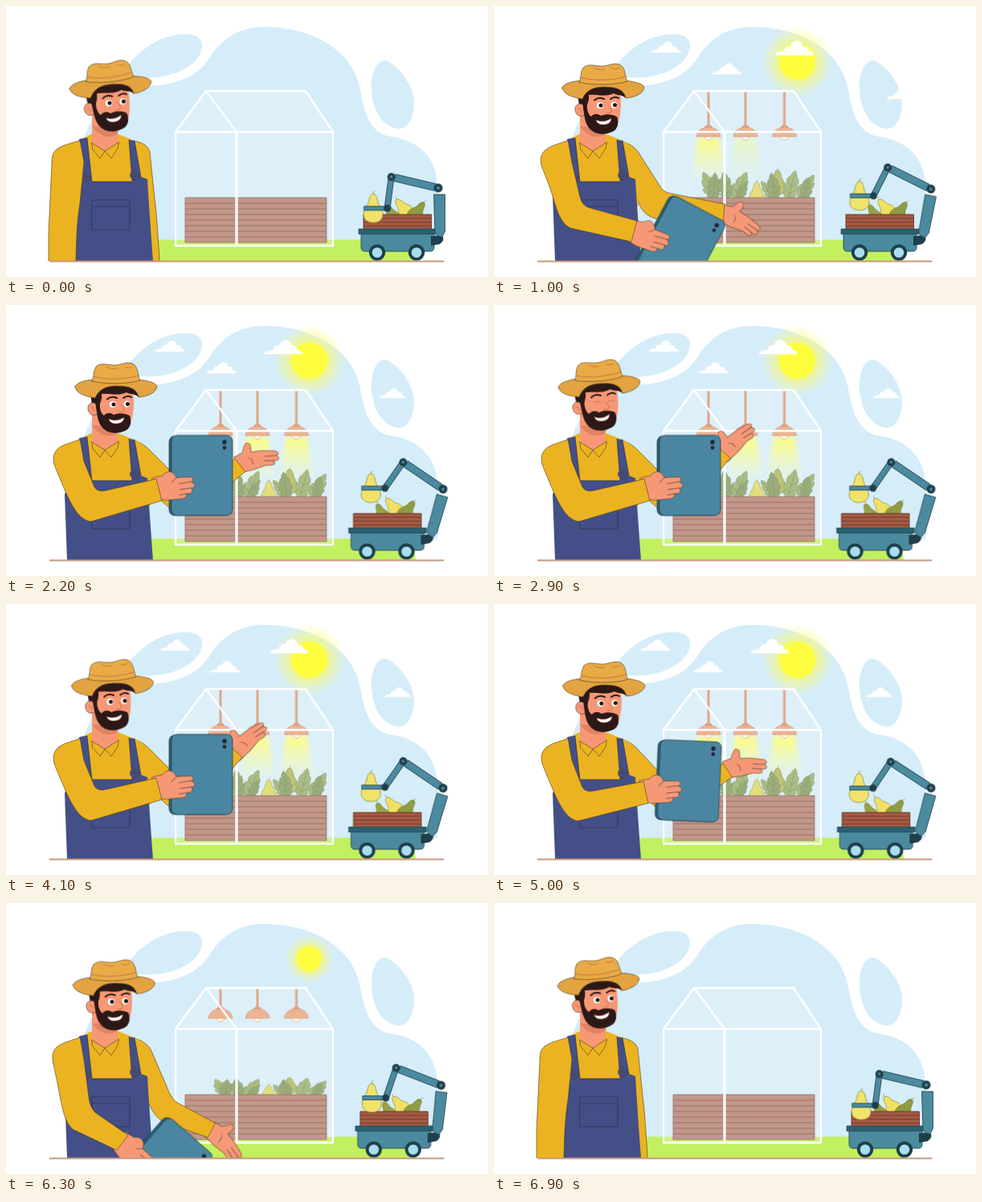
Recreate the animation shown at these times as an HTML page. Size 600 by 338 pixels, loop 7 s.

```html
<!DOCTYPE html>
<html lang="en">
<head>
<meta charset="utf-8">
<title>Smart greenhouse</title>
<style>
html, body { margin: 0; width: 100%; height: 100%; overflow: hidden; background: #fff; }
svg { display: block; width: 100vw; height: 100vh; }

/* Everything plays forward for half the loop, then back. */
.a { animation: 3.5s ease-in-out -50ms infinite alternate both; }

.ink { stroke: #4a3a20; stroke-width: .6; stroke-linejoin: round; stroke-linecap: round; }
.line { fill: none; stroke: #2b2a38; stroke-width: .6; stroke-linecap: round; }
.fold { fill: none; stroke: #b9603f; stroke-width: .7; stroke-linecap: round; }
.shirt { fill: #ebb321; }
.skin { fill: #f69876; }
.denim { fill: #444f88; }
.hair { fill: #2c1917; }
.steel { fill: #4b8a9f; stroke: #1d3f4a; stroke-width: .8; }
.dark { fill: #1f3f4a; }

/* sky */
.sun { transform-origin: 377px 70px; animation-name: sun; }
@keyframes sun { 0%, 7% { transform: scale(0); } 26%, 100% { transform: scale(1); } }
.cloud { fill: #fff; animation-timing-function: ease-out; }
.c1 { animation-name: c1; } .c2 { animation-name: c2; }
.c3 { animation-name: c3; } .c4 { animation-name: c4; }
@keyframes c1 {
  0%, 23% { transform: translate(410px, 53.5px); opacity: 0; }
  30% { transform: translate(374px, 53.5px); opacity: 1; }
  35.7% { transform: translate(356px, 53.5px); }
  50% { transform: translate(342px, 53.5px); animation-timing-function: linear; }
  64.3% { transform: translate(345px, 53.5px); animation-timing-function: linear; }
  83% { transform: translate(353px, 53.5px); animation-timing-function: linear; }
  100% { transform: translate(359px, 53.5px); }
}
@keyframes c2 {
  0%, 23% { transform: translate(242px, 52px) scale(.78); opacity: 0; }
  30% { transform: translate(214px, 52px) scale(.78); opacity: 1; }
  35.7% { transform: translate(200px, 52px) scale(.78); }
  45% { transform: translate(197px, 52px) scale(.78); animation-timing-function: linear; }
  64.3% { transform: translate(204px, 52px) scale(.78); animation-timing-function: linear; }
  83% { transform: translate(211px, 52px) scale(.78); animation-timing-function: linear; }
  100% { transform: translate(217px, 52px) scale(.78); }
}
@keyframes c3 {
  0%, 23% { transform: translate(318px, 79px) scale(.78); opacity: 0; }
  30% { transform: translate(290px, 79px) scale(.78); opacity: 1; }
  35.7% { transform: translate(269px, 79px) scale(.78); }
  50% { transform: translate(265px, 79px) scale(.78); animation-timing-function: linear; }
  64.3% { transform: translate(268px, 79px) scale(.78); animation-timing-function: linear; }
  83% { transform: translate(273px, 79px) scale(.78); animation-timing-function: linear; }
  100% { transform: translate(277px, 79px) scale(.78); }
}
@keyframes c4 {
  0%, 23% { transform: translate(516px, 110.5px) scale(.68); opacity: 0; }
  30% { transform: translate(505px, 110.5px) scale(.68); opacity: 1; }
  35.7% { transform: translate(496px, 110.5px) scale(.68); }
  54% { transform: translate(479px, 110.5px) scale(.68); animation-timing-function: linear; }
  64.3% { transform: translate(481px, 110.5px) scale(.68); animation-timing-function: linear; }
  83% { transform: translate(488px, 110.5px) scale(.68); animation-timing-function: linear; }
  100% { transform: translate(494px, 110.5px) scale(.68); }
}

/* greenhouse */
.lamp { animation-name: lamp; }
@keyframes lamp { 0%, 8% { transform: translateY(-64px); } 25%, 100% { transform: none; } }
.l1 { animation-name: l1; } .l2 { animation-name: l2; } .l3 { animation-name: l3; }
@keyframes l1 { 0%, 22% { opacity: 0; } 30%, 100% { opacity: 1; } }
@keyframes l2 { 0%, 25% { opacity: 0; } 36%, 100% { opacity: 1; } }
@keyframes l3 { 0%, 31% { opacity: 0; } 43%, 100% { opacity: 1; } }
.plants { transform-origin: 313px 241px; animation-name: grow; }
@keyframes grow { 0%, 7% { transform: scaleY(0); } 27%, 100% { transform: scaleY(1); } }

/* robot */
.bot { animation-timing-function: linear; }
.cart { animation-name: cart; } .low { animation-name: low; } .up { animation-name: up; }
.fore { animation-name: fore; } .grip { animation-name: grip; }
@keyframes cart { 0%, 1.4% { transform: none; } 30% { transform: translateX(-7px); } 60%, 100% { transform: translateX(-12.5px); } }
@keyframes low { 0%, 1.4% { transform: rotate(-90deg); } 30% { transform: rotate(-78.5deg); } 60%, 100% { transform: rotate(-73.2deg); } }
@keyframes up { 0%, 1.4% { transform: rotate(-76.7deg); } 30% { transform: rotate(-74.9deg); } 60%, 100% { transform: rotate(-72.6deg); } }
@keyframes fore { 0%, 1.4% { transform: rotate(-96deg); } 30% { transform: rotate(-90deg); } 60%, 100% { transform: rotate(-89.3deg); } }
@keyframes grip { 0%, 1.4% { transform: rotate(262.7deg); } 30% { transform: rotate(243.4deg); } 60%, 100% { transform: rotate(235.1deg); } }

/* farmer */
.head { transform-origin: 120px 158px; animation-name: head; }
@keyframes head {
  0%, 1.4% { transform: translate(-1px, -2px) rotate(-5deg); }
  28%, 36% { transform: none; }
  64.3% { transform: translate(1px, 0); }
  81.4% { transform: translate(-1px, -1.5px) rotate(-2.5deg); animation-timing-function: linear; }
  84.3% { transform: translate(-1px, -2px) rotate(-4deg); }
  100% { transform: translate(-1px, -2px) rotate(-6deg); }
}
.open, .shut { animation-timing-function: step-end; }
.open { animation-name: open; } .shut { animation-name: shut; }
@keyframes open { 0% { opacity: 1; } 83% { opacity: 0; } 90%, 100% { opacity: 1; } }
@keyframes shut { 0% { opacity: 0; } 83% { opacity: 1; } 90%, 100% { opacity: 0; } }

.armL { animation-name: armL; } .handL { animation-name: handL; }
.armR { animation-name: armR; } .handR { animation-name: handR; }
.tablet { animation-name: tablet; }
@keyframes armL {
  0%, 1.4% { d: path("M92 168C80 171 70 174 64 178C58 182 57 188 57 196C56 218 55 240 54 262C53 275 53 285 53 296L53 345L86 345L88 285C89 270 90 258 92 246L97 195Z"); }
  28.5%, 34% { d: path("M92 168C82 171 72 174 66 178C58 184 57 190 59 199C64 212 69 224 73 237C78 254 82 270 95 277L171 294L178 268L120 252C112 250 109 245 107 238L97 195Z"); }
  61.4%, 100% { d: path("M92 168C82 171 72 174 66 178C59 184 58 190 60 199C65 212 70 223 75 235C83 252 92 269 106 270L194 244L187 217L126 231C118 233 113 232 110 227L97 195Z"); }
}
@keyframes handL {
  0%, 1.4% { transform: translate(70px, 345px) rotate(90deg); }
  28.5%, 34% { transform: translate(174px, 281px) rotate(15deg); }
  61.4%, 100% { transform: translate(189px, 228px) rotate(-9deg); }
}
@keyframes armR {
  0%, 1.4% { d: path("M158 168C170 170 177 174 179 182L185 240C187 255 188 270 189 285L193 345L165 345L163 285C163 270 163 255 163 240L160 225Z"); }
  28.5%, 34% { d: path("M158 168C170 172 177 177 182 186L205 222C209 230 214 233 221 234L287 247L285 272L205 266C195 264 188 260 183 252L172 225Z"); }
  62.8% { d: path("M158 168C167 171 173 175 179 181L202 204C214 228 226 238 236 231L285 192L298 208L240 256C226 264 210 260 200 250L172 225Z"); }
  80%, 100% { d: path("M158 168C167 171 173 175 179 181L202 204C214 228 226 238 236 229L279 177L294 191L240 256C226 264 210 260 200 250L172 225Z"); }
}
@keyframes handR {
  0%, 1.4% { transform: translate(179px, 348px) rotate(90deg); }
  28.5%, 34% { transform: translate(286px, 260px) rotate(23deg); }
  62.8% { transform: translate(292px, 199px) rotate(-16deg); }
  80%, 100% { transform: translate(287px, 185px) rotate(-47deg); }
}
@keyframes tablet {
  0%, 1.4% { transform: translate(150px, 345px) rotate(75deg); }
  28.5%, 34% { transform: translate(223px, 235px) rotate(28deg); }
  61.4%, 100% { transform: translate(206px, 162.5px); }
}
</style>
</head>
<body>
<svg viewBox="0 0 600 338" preserveAspectRatio="none">
  <defs>
    <radialGradient id="glow">
      <stop offset=".45" stop-color="#fdfb4a" stop-opacity=".7"/>
      <stop offset="1" stop-color="#fdfb8a" stop-opacity="0"/>
    </radialGradient>
    <linearGradient id="beam" x2="0" y2="1">
      <stop offset="0" stop-color="#fbfc62"/>
      <stop offset="1" stop-color="#fbfc9a" stop-opacity="0"/>
    </linearGradient>
    <filter id="soft" x="-30%" width="160%"><feGaussianBlur stdDeviation="2.500"/></filter>
    <clipPath id="above"><path d="M0 0H600V318H0Z"/></clipPath>
    <clipPath id="roof"><path d="M200 107H420V300H200Z"/></clipPath>
    <path id="cloud" d="M-24 8C-22 3-17 3-13 3C-12-3-8-4-5-3C-3-12 10-12 11-2C15-4 18-1 18 3C21 3 24 5 24 8Z"/>
    <path id="leaf" d="M0 0C-3-3-8-4-8-9C-6-9-6-10-7-11C-9-13-10-16-9-19C-7-18-6-19-7-21C-8-24-7-27-6-29C-4-28-4-29-4-31C-3-34-2-36 0-38C2-36 3-34 4-31C4-29 4-28 6-29C7-27 8-24 7-21C6-19 7-18 9-19C10-16 9-13 7-11C6-10 6-9 8-9C8-4 3-3 0 0ZM0 0V-32M0-8L-5-13M0-8L5-13M0-17L-5-22M0-17L5-22" stroke="#64794a" stroke-width=".5"/>
    <g id="pear" stroke="#6b6a20" stroke-width=".6">
      <path d="M0-17C0-20 1-21 2-22" fill="none"/>
      <path d="M0-18C4-18 5-12 6-7C8-2 12 1 12 8C12 15 6 18 0 18C-6 18-12 15-12 8C-12 1-8-2-6-7C-5-12-4-18 0-18Z"/>
    </g>
    <g id="lamp">
      <path d="M0 100V150" stroke="#d98f6a" stroke-width="3"/>
      <path d="M-5 152Q-4 148 0 148Q4 148 5 152Z" fill="#d98f6a"/>
      <circle cy="163" r="4.500" fill="#fff6d8" stroke="#d58460" stroke-width=".6"/>
      <path d="M-15 163C-14 147 14 147 15 163Z" fill="#e9a27a" stroke="#b96a48" stroke-width=".5"/>
    </g>
    <path id="cone" d="M-13 165H13L23 222H-23Z" fill="url(#beam)" filter="url(#soft)"/>
    <g id="wheel">
      <circle r="10.2" class="dark"/>
      <circle r="6.3" fill="#a9def0"/>
    </g>
  </defs>

  <!-- backdrop -->
  <g fill="#d5edf9">
    <path d="M93 292V190C95 150 122 104 175 100C215 98 238 88 254 64C273 33 300 25 326 26C384 28 432 56 441 104C446 136 455 160 480 163C515 168 536 190 537 225V292Z"/>
    <path d="M150 76C165 58 185 40 212 36C230 33 245 37 244 50C243 68 224 80 204 86C185 91 165 90 148 86Z"/>
    <path d="M455 105C454 85 461 68 471 68C484 69 508 98 508 119C508 138 501 153 489 153C468 152 456 128 455 105Z"/>
  </g>
  <path d="M110 291.500H500Q509 300 510 318H110Z" fill="#c3f05f"/>
  <g class="a sun">
    <circle cx="377.500" cy="69.500" r="45" fill="url(#glow)"/>
    <circle cx="377.500" cy="69.500" r="22.500" fill="#fefe3e"/>
  </g>
  <use href="#cloud" class="a cloud c1"/>
  <use href="#cloud" class="a cloud c2"/>
  <use href="#cloud" class="a cloud c3"/>
  <use href="#cloud" class="a cloud c4"/>

  <!-- greenhouse -->
  <g clip-path="url(#roof)">
    <g transform="translate(267)"><use href="#cone" class="a l1"/><use href="#lamp" class="a lamp"/></g>
    <g transform="translate(313)"><use href="#cone" class="a l2"/><use href="#lamp" class="a lamp"/></g>
    <g transform="translate(361.500)"><use href="#cone" class="a l3"/><use href="#lamp" class="a lamp"/></g>
    <g class="a plants">
      <g fill="#dcd95a">
        <use href="#pear" transform="translate(327 233) scale(.75)"/>
        <use href="#pear" transform="translate(353 220) scale(.85)" fill="#adb557"/>
      </g>
      <g fill="#97ad66">
        <use href="#leaf" transform="translate(276 242) rotate(-24)"/>
        <use href="#leaf" transform="translate(299 242) rotate(24)"/>
        <use href="#leaf" transform="translate(352 242) rotate(-40) scale(.8)"/>
        <use href="#leaf" transform="translate(380 242) rotate(30) scale(.95)"/>
        <use href="#leaf" transform="translate(366 242) rotate(14)"/>
      </g>
      <g fill="#83995a">
        <use href="#leaf" transform="translate(273 242) rotate(4) scale(.9)"/>
        <use href="#leaf" transform="translate(290 242) rotate(-6) scale(.95)"/>
        <use href="#leaf" transform="translate(304 242) rotate(24) scale(.65)"/>
        <use href="#leaf" transform="translate(350 242) rotate(-8) scale(.9)"/>
        <use href="#leaf" transform="translate(386 242) rotate(10) scale(.75)"/>
      </g>
    </g>
  </g>
  <path d="M223 239H399V295H223Z" fill="#b37d6c" stroke="#7d4d3e" stroke-width=".8"/>
  <path d="M223 246h176m-176 7h176m-176 7h176m-176 7h176m-176 7h176m-176 7h176m-176 7h176" stroke="#7c4b3c" stroke-width=".9"/>
  <path d="M211 299V157L249 106H373L407 157V299Z" fill="#fff" fill-opacity=".2"/>
  <path d="M211 157L249 106H373L407 157V299H211V157H407M249 106L287 157" fill="none" stroke="#fff" stroke-width="2.400" stroke-linejoin="round"/>
  <path d="M287 157V299" stroke="#fff" stroke-width="3.200"/>

  <!-- robot -->
  <g class="a bot cart">
    <use href="#pear" transform="translate(480 260) rotate(-25) scale(.72)" fill="#97a146"/>
    <use href="#pear" transform="translate(495 253) rotate(-38) scale(.8)" fill="#f0e062"/>
    <use href="#pear" transform="translate(512 257) rotate(34) scale(.8)" fill="#8f9c42"/>
    <path d="M445 260H529.500V279H445Z" fill="#a35a43" stroke="#5f2e22" stroke-width=".8"/>
    <path d="M445 264.800h84m-84 4.800h84m-84 4.800h84" stroke="#6b3527" stroke-width=".8"/>
    <path d="M442 283H533V301Q533 306 528 306H447Q442 306 442 301Z" class="steel"/>
    <path d="M439 278H536V284.500H439Z" fill="#2b6070" stroke="#1d3f4a" stroke-width=".6"/>
    <use href="#wheel" x="462" y="307.500"/>
    <use href="#wheel" x="511" y="307.500"/>
    <path d="M529 287L543 286Q547 292 540 297L529 299Z" class="dark"/>
    <g transform="translate(538 291)"><g class="a bot low">
      <path d="M3 0L8-4L56-5.500V8.500H10L3 5Z" class="steel"/>
      <circle r="4.500" class="dark"/>
      <g transform="translate(64 0)"><g class="a bot up">
        <path d="M4-4.500H56V4.500H4Z" class="steel"/>
        <circle r="5.500" class="dark"/><circle r="2" fill="#4b8a9f"/>
        <g transform="translate(60 0)"><g class="a bot fore">
          <path d="M3-3.500H37V3.500H3Z" class="steel"/>
          <circle r="5" class="dark"/><circle r="1.800" fill="#4b8a9f"/>
          <g transform="translate(39.500 0)"><g class="a bot grip">
            <use href="#pear" x="-17.500" y="0" fill="#f1e36a"/>
            <path d="M-29-2.500H-3V2.500H-29Z" class="steel"/>
            <circle r="4.500" class="dark"/>
          </g></g>
        </g></g>
      </g></g>
    </g></g>
  </g>

  <!-- farmer -->
  <g clip-path="url(#above)">
    <g class="a handR">
      <path class="skin ink" d="M-5-11L6-13C10-19 12-25 16-23C20-21 18-16 17-11L30-9L46-4C50-2 50 2 46 2L48 5C48 9 44 8 40 7L42 10C40 14 34 11 30 10L14 11L-5 10Z"/>
      <path class="line" d="M46 2L32-1M40 7L30 4M12-5C15-3 16 0 15 4"/>
    </g>
    <path class="a armR shirt ink" d="M158 168Z"/>
    <path class="shirt" d="M82 172L106 160H140L160 168Q173 173 174 184L180 250H78V190Z"/>
    <path class="skin" d="M107 135V174C114 186 131 186 139 173V145Z"/>
    <path d="M107 150C117 164 130 166 139 159V152Z" fill="#e08463"/>
    <path class="shirt ink" d="M107 171L123 181L117 190L108 179ZM140 170L123 181L131 190L139 178Z"/>
    <path class="denim" d="M91 166L101 164L107 219H157L153 167L160 168L168 213L176 216C178 250 181 290 183 318H76L73 236L80 221L97 219Z"/>
    <path class="line" d="M101 165L107 219H157L153 167M160 168L168 213M107 242H154V279H107ZM107 250H154"/>
    <g class="denim ink"><circle cx="99" cy="214" r="5.500"/><circle cx="160" cy="211" r="5.500"/><circle cx="99" cy="214" r="2"/><circle cx="160" cy="211" r="2"/></g>

    <g class="a tablet">
      <rect x="-3" y="1" width="76" height="99" rx="7" fill="#2f6278" stroke="#193744" stroke-width=".7"/>
      <rect width="76" height="100" rx="7" fill="#4a86a1" stroke="#193744" stroke-width=".7"/>
      <g fill="#232338"><circle cx="66" cy="8.500" r="2.700"/><circle cx="66" cy="15.500" r="2.300"/></g>
    </g>
    <g class="a handL">
      <path class="skin ink" d="M-5-13L8-14C15-20 21-19 25-9L42-7C46-6 46-1 42-1L44 1C47 3 46 7 42 7H41C43 11 41 14 37 13H34C34 18 29 19 25 18L8 17L-5 13Z"/>
      <path class="line" d="M25-9L18-4M27-1H42M27 6.500H41M25 13H34"/>
    </g>
    <path class="a armL shirt ink" d="M92 168Z"/>

    <g class="a head">
      <path class="skin" d="M110 104H157C159 122 158 140 153 148L142 157H122L111 142Z"/>
      <path class="hair" d="M103 104Q135 90 166 104Q168 112 164 115C160 110 154 112 149 109C139 114 128 110 118 111C119 118 116 121 115 127L106 124Z"/>
      <path class="skin ink" d="M112 124C106 119 100 124 101 130C102 137 108 139 113 136Z"/>
      <path class="fold" d="M105 128Q108 127 109 132"/>
      <path class="hair" d="M110 120L116 122C115 130 118 136 121 138C124 134 129 134 133 137C139 134 148 135 153 138C156 146 154 154 147 157C138 161 126 161 119 153C112 145 112 132 110 120Z"/>
      <path d="M127 142C134 145 140 144 146 140C146 146 141 148 136 148C131 148 128 146 127 142Z" fill="#fff" stroke="#8c3a30" stroke-width=".6"/>
      <path class="fold" d="M142 124Q148 130 145 133Q143 134 140 133"/>
      <path d="M125 117.500Q130 113 137 116M145 116Q150 112 155 115" fill="none" stroke="#2c1917" stroke-width="2" stroke-linecap="round"/>
      <g class="a open">
        <g fill="#fff"><ellipse cx="132" cy="124" rx="4.200" ry="4"/><ellipse cx="149.500" cy="123.500" rx="3.800" ry="4"/></g>
        <g fill="#201514"><circle cx="133" cy="124" r="2.500"/><circle cx="150.500" cy="123.500" r="2.500"/></g>
      </g>
      <path class="a shut fold" d="M128 124Q132 122 136 124M146 124Q150 122 153 123.500"/>
      <path class="ink" fill="#e3a340" d="M85 102C87 96 98 94 108 93H164C174 94 187 97 187 102C186 109 176 114 164 115C162 104 152 101 137 101C121 101 114 107 110 116C97 114 86 110 85 102Z"/>
      <path class="ink" fill="#e9ab46" d="M106 95C109 90 107 83 111 77C117 71 126 75 134 75C143 75 150 69 158 74C164 78 163 89 166 94C150 99 121 99 106 95Z"/>
      <path class="fold" d="M108 89C123 94 149 93 164 88M124 77Q130 81 137 79M147 78Q152 80 156 77"/>
    </g>
  </g>
  <path d="M54 318.500H545" stroke="#c69a7d" stroke-width="2"/>
</svg>
</body>
</html>
```
